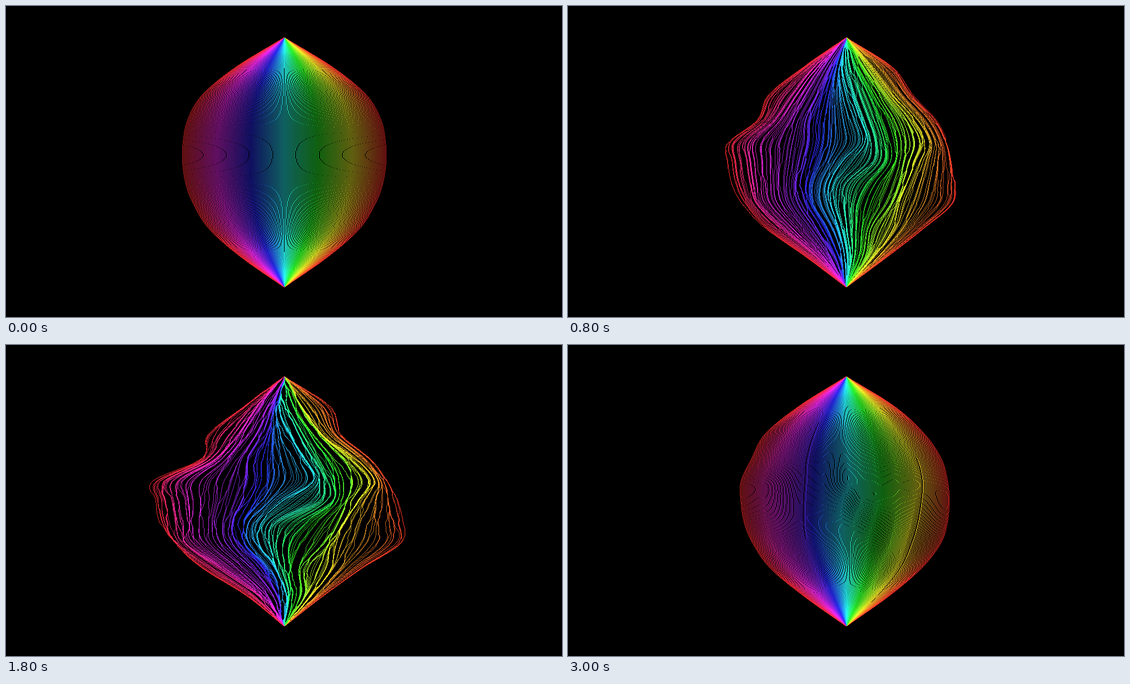
An HTML page with a canvas that plays this animation: 1000 px wide and 560 px high, repeating every 3200 ms.

```html
<!DOCTYPE html>
<html lang="en">
<head>
<meta charset="utf-8">
<title>Rainbow strands</title>
<style>
html, body { margin: 0; width: 100%; height: 100%; overflow: hidden; background: #000; }
canvas { display: block; width: 1000px; height: 560px; }
</style>
</head>
<body>
<canvas id="stage" width="1000" height="560"></canvas>
<script>
const start = performance.now();
const ctx = document.getElementById('stage').getContext('2d');
const WIDTH = 1000, HEIGHT = 560, TOP = 56, ROW = 2, ROWS = 226, LINES = 180;
const STEP_MS = 200, LAST = 8, REACH = 16, SPAN = 2 * REACH + 1;
const LEVELS = [56, 110, 160, 205, 245, 280, 320, 355, 400, 450, 506];

// Smooth curve through the levels, sampled once per row.
function curve(end, ...inner) {
  const v = [end, ...inner, end], n = v.length - 1;
  const slope = v.map((_, i) => {
    const a = Math.max(0, i - 1), b = Math.min(n, i + 1);
    return (v[b] - v[a]) / (LEVELS[b] - LEVELS[a]);
  });
  return Float32Array.from({ length: ROWS }, (_, r) => {
    const y = TOP + r * ROW;
    let i = 0;
    while (i < n - 1 && y > LEVELS[i + 1]) i++;
    const d = LEVELS[i + 1] - LEVELS[i], t = (y - LEVELS[i]) / d, s = 1 - t;
    return s * s * (1 + 2 * t) * v[i] + t * t * (1 + 2 * s) * v[i + 1]
      + d * t * s * (s * slope[i] - t * slope[i + 1]);
  });
}

// A main strand of the turbulent shape: hue, then x at each inner level.
const strand = (hue, ...xs) => ({ hue, x: curve(500, ...xs) });

const half = curve(0, 88, 148, 174, 182, 183, 177, 164, 136, 80);
const strands = [
  strand(5, 580, 600, 655, 684, 700, 710, 712, 642, 572),
  strand(58, 533, 568, 622, 655, 632, 606, 588, 580, 547),
  strand(95, 525, 560, 604, 622, 612, 598, 578, 536, 535),
  strand(130, 511, 542, 568, 588, 590, 535, 507, 506, 512),
  strand(160, 504, 522, 548, 567, 560, 488, 480, 490, 505),
  strand(185, 490, 510, 536, 554, 500, 458, 457, 483, 500),
  strand(222, 484, 476, 478, 475, 458, 428, 430, 470, 494),
  strand(260, 480, 462, 436, 436, 422, 406, 412, 452, 486),
  strand(318, 448, 412, 372, 306, 310, 316, 322, 383, 452),
  strand(358, 428, 364, 348, 267, 270, 278, 300, 350, 430)
];

function hash(i, j) {
  let h = Math.imul(i, 374761393) + Math.imul(j, 668265263) + 977;
  h = Math.imul(h ^ (h >>> 13), 1274126177);
  return ((h ^ (h >>> 16)) >>> 0) / 4294967296;
}

function noise(x, y) {
  const i = Math.floor(x), j = Math.floor(y), u = x - i, v = y - j;
  const mix = (a, b, t) => a + (b - a) * t;
  return mix(mix(hash(i, j), hash(i + 1, j), u),
    mix(hash(i, j + 1), hash(i + 1, j + 1), u), v);
}

const terrain = new Float32Array(ROWS * WIDTH);
for (let r = 0; r < ROWS; r++) {
  for (let x = 200; x < 800; x++) {
    terrain[r * WIDTH + x] = 0.55 * noise(x / 3.5, r / 2.5) + 0.45 * noise(x / 10 + 300, r / 6);
  }
}

function guide(hue, amount) {
  let i = 0;
  while (i < strands.length - 2 && hue > strands[i + 1].hue) i++;
  const a = strands[i], b = strands[i + 1];
  const f = Math.min(1, Math.max(0, (hue - a.hue) / (b.hue - a.hue)));
  const eased = f * (1 + f * (3 - 2 * f)) / 2;
  return half.map((w, r) => {
    const calm = 500 + w * (1 - hue / 180);
    return calm + (a.x[r] + (b.x[r] - a.x[r]) * eased - calm) * amount;
  });
}

// Cheapest route through the terrain that stays near its guide.
const back = new Int8Array(ROWS * SPAN);
function route(path, amount) {
  let cost = new Float32Array(SPAN).fill(1e9), next = new Float32Array(SPAN);
  cost[REACH] = 0;
  for (let r = 1; r < ROWS; r++) {
    for (let k = 0; k < SPAN; k++) {
      const off = k - REACH;
      let best = 1e9, move = 0;
      for (let m = -2; m <= 2; m++) {
        const from = k - m;
        if (from < 0 || from >= SPAN) continue;
        const c = cost[from] + 0.45 * m * m;
        if (c < best) { best = c; move = m; }
      }
      next[k] = best + 0.005 * off * off
        + 3 * amount * terrain[r * WIDTH + Math.round(path[r] + off)];
      back[r * SPAN + k] = move;
    }
    [cost, next] = [next, cost];
  }
  const out = new Float32Array(ROWS);
  for (let r = ROWS - 1, k = REACH; r >= 0; r--) {
    out[r] = path[r] + k - REACH;
    k -= back[r * SPAN + k];
  }
  return out;
}

function color(hue) {
  const low = 0.16 * 255;
  return [0, 8, 4].map(n => {
    const k = (n + hue / 30) % 12;
    const c = 0.5 - 0.5 * Math.max(-1, Math.min(k - 3, 9 - k, 1));
    return low + (255 - low) * c;
  });
}

function render(state) {
  const image = ctx.createImageData(WIDTH, HEIGHT), px = image.data;
  const amount = state / 7;
  for (let p = 3; p < px.length; p += 4) px[p] = 255;
  for (let i = 0; i < LINES; i++) {
    const hue = i * 360 / (LINES - 1), rgb = color(hue);
    const path = guide(hue, amount), xs = amount ? route(path, amount) : path;
    let last = 500;
    for (let d = 0; d <= (ROWS - 1) * ROW; d++) {
      const r = Math.floor(d / ROW), t = d / ROW - r;
      const x = Math.round(xs[r] + ((xs[r + 1] ?? xs[r]) - xs[r]) * t);
      const dir = Math.sign(x - last), count = Math.max(1, Math.abs(x - last));
      for (let n = 0; n < count; n++) {
        const p = ((TOP + d) * WIDTH + x - n * dir) * 4;
        for (let c = 0; c < 3; c++) px[p + c] += (rgb[c] - px[p + c]) * 0.75;
      }
      last = x;
    }
  }
  return image;
}

const pictures = Array.from({ length: LAST + 1 }, (_, state) => render(state));
let shown = -1;
function frame() {
  const step = Math.floor((performance.now() - start) / STEP_MS) % (2 * LAST);
  const state = step <= LAST ? step : 2 * LAST - step;
  if (state !== shown) ctx.putImageData(pictures[shown = state], 0, 0);
  requestAnimationFrame(frame);
}
frame();
</script>
</body>
</html>
```
